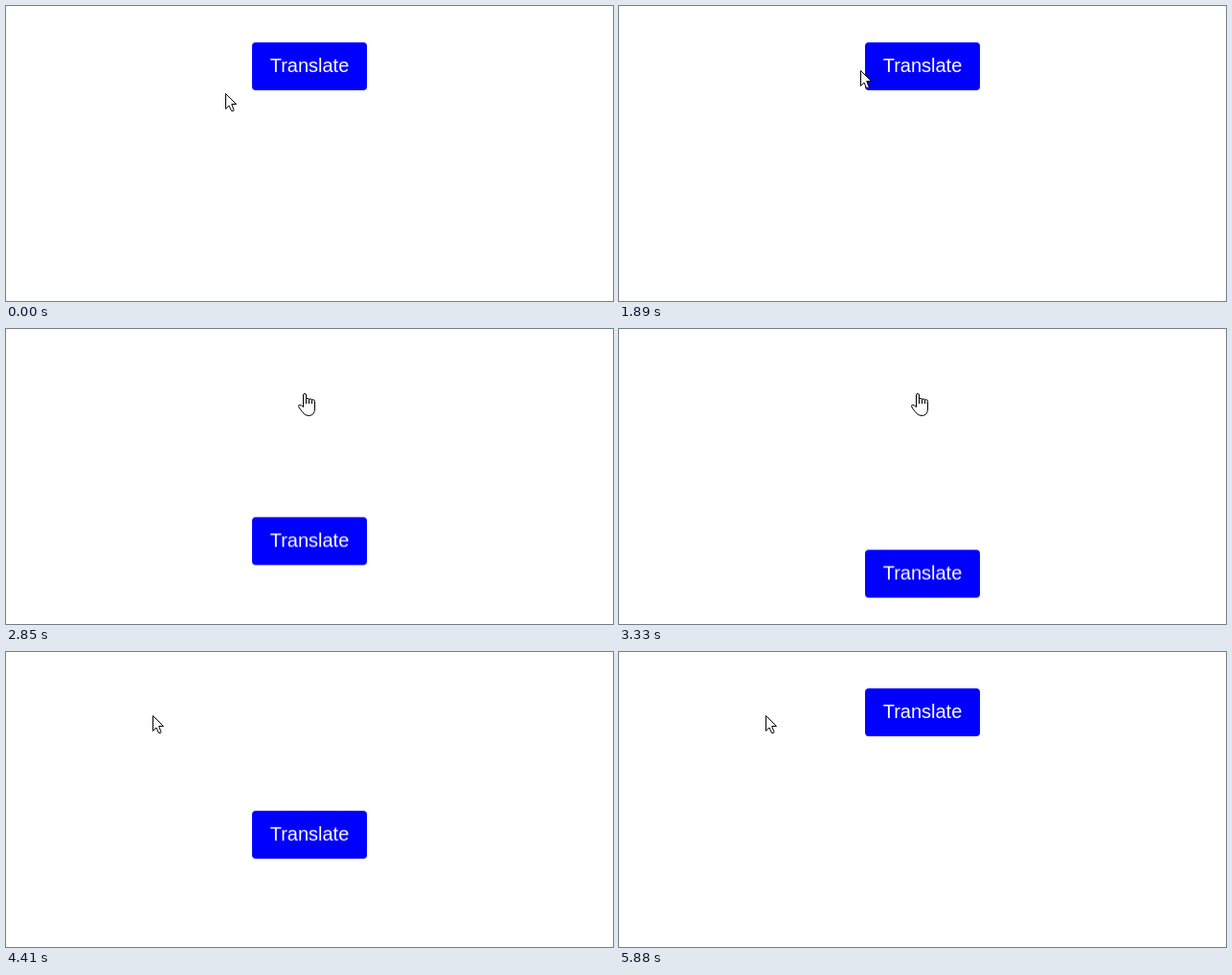
An HTML page that plays this animation: 634x308 px, repeating every 6.3 s.

```html
<!DOCTYPE html>
<html lang="en">
<head>
<meta charset="utf-8">
<title>Translate button</title>
<style>
  html, body { margin: 0; width: 100%; height: 100%; overflow: hidden; background: #fff; }
  #button {
    position: absolute; left: 257px; top: 38px; width: 120px; height: 50px;
    border-radius: 4px; background: #00f; color: #fff; text-align: center;
    font: 20px/49px "Liberation Sans", Arial, sans-serif;
    will-change: transform;
  }
  svg { position: absolute; left: 0; top: 0; width: 634px; height: 308px; }
  path { fill: #fff; stroke: #000; stroke-width: 1; stroke-linejoin: round; }
</style>
</head>
<body>
<div id="button">Translate</div>
<svg viewBox="0 0 634 308">
  <path id="arrow" d="M.5 .5V16.5L4 13L6.5 18.5H8.5L9 17.5L6.7 11.5H11.5Z"/>
  <path id="hand" d="M5.5 14.5V2Q5.5 .5 7 .5T8.5 2V6.5Q8.5 5.5 10 5.5T11.5 6.7Q11.5 6 13 6T14.5 7.3Q14.5 6.7 16 6.8T17.5 8.5V16Q17.5 23.5 11 23.5Q6.5 23.5 4.5 19.5L1 15Q0 12.5 1.5 12Q3 12 5.5 14.5ZM8.5 6.5V11M11.5 6.7V11M14.5 7.3V11"/>
</svg>
<script>
  const LOOP = 6300, STEP = 30;
  const TRAVEL = 200, DURATION = 1800;
  const ENTER = 1968, LEAVE = 3998;
  const HOTSPOT = 6;

  // Pointer waypoints: time, x, y
  const route = [
    [0, 229, 91], [90, 272, 62], [210, 222, 67],
    [1860, 222, 67], [1950, 311, 67],
    [3960, 311, 67], [4080, 153, 66], [LOOP, 153, 66]
  ];

  const button = document.getElementById("button");
  const arrow = document.getElementById("arrow");
  const hand = document.getElementById("hand");
  const clamp = v => Math.min(1, Math.max(0, v));
  const mix = (a, b, p) => a + (b - a) * p;

  // cubic-bezier(.25, .1, .25, 1)
  function ease(x) {
    let lo = 0, hi = 1;
    for (let i = 0; i < 24; i++) {
      const s = (lo + hi) / 2;
      if (0.75 * s * (1 - s) + s ** 3 < x) lo = s; else hi = s;
    }
    return 0.3 * lo * (1 - lo) ** 2 + 3 * lo * lo * (1 - lo) + lo ** 3;
  }

  const progress = (t, start) => {
    const p = clamp((t - start) / DURATION);
    return p === 0 || p === 1 ? p : ease(p);
  };

  function pointerAt(t) {
    const i = route.findIndex(p => p[0] > t);
    const [t0, x0, y0] = route[i - 1], [t1, x1, y1] = route[i];
    const p = (t - t0) / (t1 - t0);
    return [Math.round(mix(x0, x1, p)), Math.round(mix(y0, y1, p))];
  }

  function place(el, x, y, visible) {
    el.setAttribute("transform", `translate(${x} ${y})`);
    el.setAttribute("visibility", visible ? "visible" : "hidden");
  }

  function draw(t) {
    const drop = TRAVEL * (progress(t, ENTER) - progress(t, LEAVE));
    button.style.transform = `translateY(${drop.toFixed(3)}px)`;
    const [x, y] = pointerAt(t);
    const pointing = x > 257 && t < LEAVE - STEP;
    place(arrow, x, y, !pointing);
    place(hand, x - HOTSPOT, y, pointing);
  }

  const begin = performance.now();
  function tick() {
    const t = (performance.now() - begin) % LOOP;
    draw(Math.floor(t / STEP) * STEP);
    requestAnimationFrame(tick);
  }
  tick();
</script>
</body>
</html>
```
